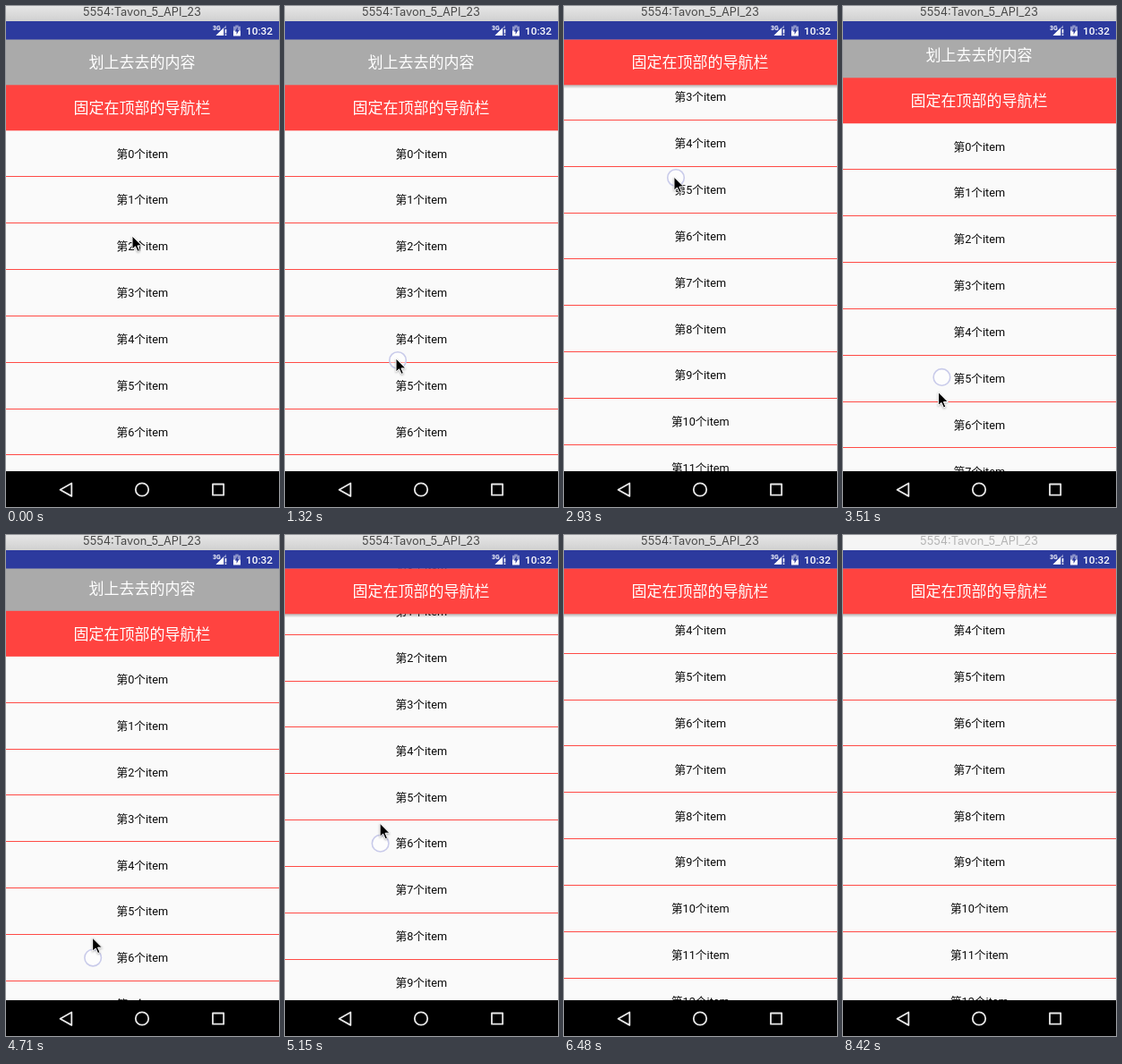
These frames come from a looping animation (305x560 px, 8440 ms). An HTML page:

```html
<!DOCTYPE html>
<html lang="zh">
<head>
<meta charset="utf-8">
<style>
html, body { margin: 0; width: 100%; height: 100%; overflow: hidden; background: #000; }
svg { display: block; width: 100vw; height: 100vh; }
text { font-family: Roboto, "Noto Sans CJK SC", "Noto Sans CJK", sans-serif; text-anchor: middle; }
.head { font-size: 17px; fill: #fff; }
#list text { font-size: 12.7px; fill: #0a0a0a; }
#list rect { fill: #ff4a45; shape-rendering: crispEdges; }
#title { font: 12.8px Inter, "Liberation Sans", sans-serif; }
#cursor { filter: drop-shadow(0 1px 1px rgba(0, 0, 0, .3)); }
.nav { fill: none; stroke: #e8e8e8; stroke-width: 1.8; stroke-linejoin: round; }
</style>
</head>
<body>
<svg viewBox="0 0 305 560">
  <defs>
    <linearGradient id="bar" x2="0" y2="1">
      <stop stop-color="#e6e6e6"/><stop offset="1" stop-color="#d0d0d0"/>
    </linearGradient>
    <linearGradient id="fade" x2="0" y2="1">
      <stop stop-opacity=".28"/><stop offset="1" stop-opacity="0"/>
    </linearGradient>
  </defs>
  <rect width="305" height="560" fill="#fafafa"/>
  <g id="list"></g>
  <g id="intro">
    <rect y="37" width="305" height="52" fill="#aaa"/>
    <text class="head" x="152" y="69.4">划上去去的内容</text>
  </g>
  <g id="tabs">
    <rect y="88.3" width="305" height="51" fill="#ff4340"/>
    <text class="head" x="152" y="120.4">固定在顶部的导航栏</text>
    <rect id="shadow" y="139.3" width="305" height="4" fill="url(#fade)"/>
  </g>

  <rect y="17" width="305" height="20.5" fill="#2c3a9e"/>
  <g fill="#fff">
    <text x="235.3" y="27" font-size="7" font-weight="700">3G</text>
    <path d="M234.5 33L246 21.5V25H243.5V33Z" opacity=".45"/>
    <path d="M234.5 33L243 24.5V33Z"/>
    <path d="M244.7 26h1.6v4.5h-1.6zM244.7 31.5h1.6v1.6h-1.6z"/>
    <path d="M256.3 21.5h3.4v1.3h2.3v5h-8v-5h2.3z" opacity=".45"/>
    <path d="M254 27.5h8V33.5h-8z"/>
    <path d="M258.8 23.5L255.8 28.6H257.6V32L260.4 27H258.8Z" fill="#2c3a9e"/>
    <text x="283" y="31.7" font-size="11.8" font-weight="500">10:32</text>
  </g>

  <rect id="window" width="305" height="17"/>
  <text id="title" x="152" y="11.3">5554:Tavon_5_API_23</text>

  <rect y="520" width="305" height="40"/>
  <path class="nav" d="M60.5 540.7L73.3 533.5V547.9Z"/>
  <circle class="nav" cx="152" cy="540.5" r="7.2"/>
  <rect class="nav" x="231" y="534.5" width="12.2" height="12.2"/>

  <circle id="touch" r="9.3" fill="#fff" fill-opacity=".5" stroke="#c9cbea" stroke-width="1.6"/>
  <path id="cursor" d="M0 0V15L3.5 11.8L6 17.4L8.4 16.4L5.9 10.9H10.8Z" stroke="#fff"/>
</svg>
<script>
const LOOP = 8440, IDLE = 8420, STEP = 146.6;
const ROW = 51.87, HEADER = 51;
const LAG = 70, SLOP = 12, RELEASE = 60;

// Pointer strokes, each from where the last one ended; those with a slop drag the list.
const origin = { x: 141, y: 257 };
const strokes = [
  { start: 0, end: 430, x: 142, y: 212 },
  { start: 590, end: 1020, x: 124, y: 394 },
  { start: 1320, end: 2340, x: 123, y: 190, power: 0.82, slop: 29, fling: 44 },
  { start: 2930, end: 3960, x: 94, y: 486, power: 2, slop: SLOP, fling: 0 },
  { start: 4568, end: 5500, x: 114, y: 215, slop: SLOP, fling: 7 },
  { start: 5650, end: 6450, x: 124, y: 575 },
];
const drags = strokes.filter(s => s.slop);

const $ = id => document.getElementById(id);
const move = (id, x, y) => $(id).setAttribute("transform", `translate(${x} ${y})`);
const mix = (a, b, u) => a + (b - a) * u;
const progress = (t, a, b) => Math.max(0, Math.min(1, (t - a) / (b - a)));
const easeOut = (u, power = 1) => 1 - (1 - u) ** power;

function pointer(t) {
  let { x, y } = origin;
  for (const s of strokes) {
    const u = progress(t, s.start, s.end);
    x = mix(x, s.x, u);
    y = mix(y, s.y, easeOut(u, s.power));
  }
  return { x, y };
}

// The list follows the finger beyond the slop, then coasts.
function scrolled(t) {
  let offset = 0;
  for (const s of drags) {
    const from = pointer(s.start).y;
    const finger = pointer(Math.max(s.start, Math.min(t - LAG, s.end))).y;
    const pull = from - finger;
    const coast = easeOut(progress(t - RELEASE, s.end, s.end + 300), 2);
    offset += Math.sign(pull) * Math.max(0, Math.abs(pull) - s.slop) + s.fling * coast;
    offset = Math.max(0, offset);
  }
  return offset;
}

let rows = "";
for (let i = 0; i < 16; i++) {
  rows += `<text x="152.3" y="${169.6 + i * ROW}">第${i}个item</text>` +
    `<rect y="${190.2 + i * ROW}" width="305" height="1"/>`;
}
$("list").innerHTML = rows;

function draw(now) {
  const time = now % LOOP;
  const t = Math.floor((time + 15) / STEP) * STEP;  // the screen refreshes in steps

  const offset = scrolled(t);
  move("list", 0, -offset);
  move("intro", 0, -offset);
  move("tabs", 0, -Math.min(offset, HEADER));
  $("shadow").style.opacity = offset > HEADER ? 1 : 0;

  const tip = pointer(t);
  move("cursor", tip.x, tip.y);

  const drag = drags.findLast(s => s.start <= t + 1);
  if (drag) {
    const dot = pointer(Math.min(t - LAG, drag.end));
    move("touch", dot.x + 2, dot.y + 2);
  }
  $("touch").style.opacity = drag ? 1 - progress(t - RELEASE, drag.end, drag.end + 200) : 0;

  const idle = time >= IDLE;
  $("window").setAttribute("fill", idle ? "#f5f5f5" : "url(#bar)");
  $("title").setAttribute("fill", idle ? "#b4b4b4" : "#484848");
}

let start;
function tick(now) {
  start ??= now;
  draw(now - start);
  requestAnimationFrame(tick);
}
draw(0);
requestAnimationFrame(tick);
</script>
</body>
</html>
```
